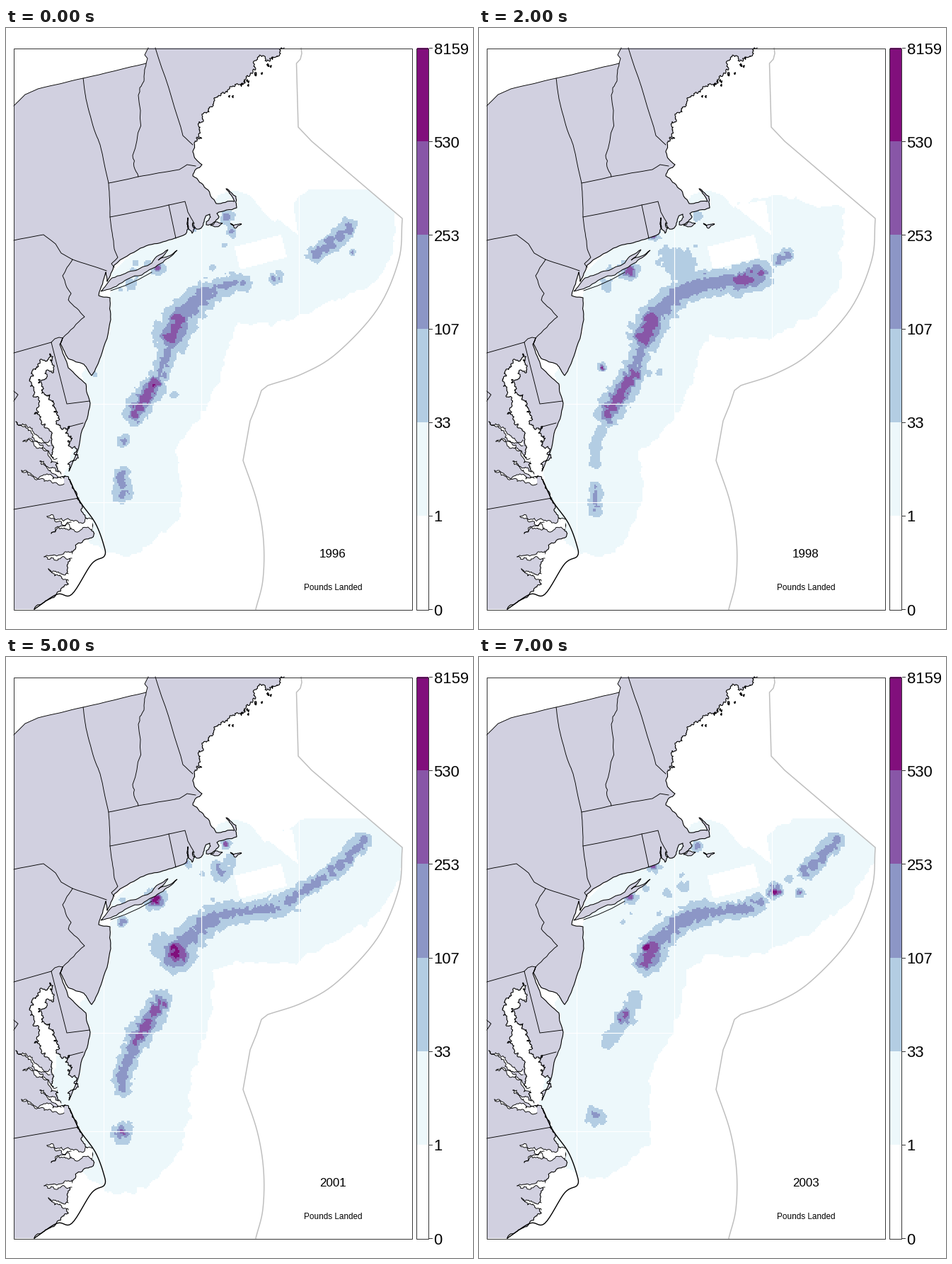
Recreate the animation shown at these times as a matplotlib script. Size 660 by 849 pixels, loop 8 s.

```python
import numpy as np
import matplotlib.pyplot as plt
from matplotlib.animation import FuncAnimation
from matplotlib.colors import ListedColormap
from matplotlib.patches import Polygon, Rectangle
from matplotlib.path import Path

W, H, DPI = 660, 849, 64
PT = 72 / DPI
L, R, T, B = 11, 575, 28, 821
COLORS = ["#ffffff", "#edf8fb", "#b3cde3", "#8c96c6", "#8856a7", "#810f7c"]
LAND = "#d1d0e0"

plt.rcParams["font.family"] = "Liberation Sans"
rng = np.random.default_rng(7)


# ---- curves ----
def spline(pts, n=8):
    """Catmull-Rom curve through the points, n steps per span."""
    p = np.array(pts, float)
    last = len(p) - 1
    p = np.vstack([2 * p[0] - p[1], p, 2 * p[-1] - p[-2]])
    t = np.linspace(0, last, last * n + 1)
    i = np.minimum(t.astype(int), last - 1)
    f = (t - i)[:, None]
    a, b, c, d = (p[i + k] for k in range(4))
    return b + f / 2 * (c - a + f * (2 * a - 5 * b + 4 * c - d + f * (3 * (b - c) + d - a)))


def rough(pts, amp, rounds=3):
    """Fractal midpoint displacement along a polyline."""
    p = np.array(pts, float)
    for _ in range(rounds):
        d = p[1:] - p[:-1]
        mid = (p[1:] + p[:-1]) / 2
        mid += np.column_stack([-d[:, 1], d[:, 0]]) * rng.uniform(-amp, amp, (len(d), 1))
        out = np.empty((2 * len(p) - 1, 2))
        out[::2], out[1::2] = p, mid
        p = out
    return p


# Seaward limit, and the shelf edge that the catch follows from south to north
LIMIT = np.vstack([
    [(417, 28), (418, 36), (416, 44), (410.5, 50), (413, 140), (432, 160), (560, 269)],
    spline([(560, 271), (555, 328), (525, 397), (468, 459), (420, 488), (370, 505)]),
    [(361, 512), (354, 533), (345, 555)],
    spline([(335, 611), (355, 670), (364, 725), (363, 780), (353, 821)]),
])
SHELF = spline([(165, 690), (165, 655), (164, 620), (167, 582), (187, 535), (206, 508), (226, 465),
                (241, 420), (268, 388), (308, 364), (380, 354), (418, 331), (468, 297), (508, 256)])


def shelf(u):
    k = np.arange(len(SHELF)) / 8
    return np.interp(u, k, SHELF[:, 0]), np.interp(u, k, SHELF[:, 1])


# ---- catch grid: 2 px cells holding a class from 0 to 5 ----
X, Y = np.meshgrid(np.arange(L + 1, R, 2.0), np.arange(T + 1, B, 2.0))


def smooth_noise(passes):
    n = rng.normal(size=X.shape)
    for _ in range(passes):
        for axis in (0, 1):
            n = (np.roll(n, 1, axis) + 2 * n + np.roll(n, -1, axis)) / 4
    return n / n.std()


EDGE, DRIFT = smooth_noise(2), smooth_noise(8)


def inside(pts):
    cells = np.column_stack([X.ravel(), Y.ravel()])
    return Path(pts).contains_points(cells).reshape(X.shape)


INSHORE = inside([(150, 345), (200, 300), (285, 262), (300, 236), (322, 229), (345, 236), (366, 262),
                  (400, 293), (380, 354), (308, 364), (241, 420), (206, 508), (165, 582), (165, 690),
                  (120, 710), (95, 655), (91, 625), (120, 530), (107, 488), (148, 430), (148, 375)])
CLOSED = (inside([(323, 309), (389, 292), (397, 324), (331, 341)])
          | inside([(361, 251), (405, 243), (413, 293)])
          | ((X > 345) & (Y < 229)) | ~inside(np.vstack([LIMIT, [(L, B), (L, T)]])))
REACH_AT = [0, 1, 3, 5, 7, 9, 11, 12, 13]


def heat(dist, radius, peak):
    """Class 2 at the radius, rising to the peak class at the centre."""
    q = np.clip((dist + EDGE * min(2, 0.15 * radius)) / radius, 0, 1)
    rise = (peak - 1) * (1 - q) ** 1.5 * (1 + 0.1 * DRIFT)
    return np.where(q < 1, np.minimum(2 + rise, int(peak)), 0)


def season(reach, runs, spots):
    """reach: light zone width; runs: (from, to, radius, peak) on the shelf; spots: (x, y, radius, peak)."""
    light = INSHORE.copy()
    for u in np.arange(0, 13.01, 0.125):
        x, y = shelf(u)
        light |= np.hypot(X - x, Y - y) < np.interp(u, REACH_AT, reach) + 2 * DRIFT + 0.5 * EDGE
    g = light.astype(float)
    for u0, u1, radius, peak in runs:
        dist = np.min([np.hypot(X - x, Y - y)
                       for x, y in map(shelf, np.arange(u0, u1 + 0.01, 0.125))], axis=0)
        g = np.maximum(g, heat(dist, radius, peak))
    specks = [(rng.uniform(155, 310), rng.uniform(300, 375), rng.uniform(2, 5), 2) for _ in range(8)]
    for x, y, radius, peak in spots + specks:
        g = np.maximum(g, heat(np.hypot(X - x, Y - y), radius, peak))
    g[CLOSED] = 0
    return g.astype(int)


s1996 = season(
    [54, 84, 66, 80, 80, 55, 66, 80, 42],
    [(0.9, 1.7, 13, 3.4), (3, 3, 9, 3.6), (3.8, 5.2, 17, 4.3), (5, 5, 17, 5.5), (5.2, 6.6, 13, 3),
     (6.6, 7.3, 26, 4.2), (7.3, 8.5, 21, 3.8), (8.5, 9.4, 13, 3), (10, 10.2, 9, 3.5), (11.4, 12.5, 13, 3.7)],
    [(214, 338, 11, 4), (176, 363, 8, 2), (312, 266, 11, 3.4), (318, 288, 8, 3), (263, 284, 6, 4),
     (238, 518, 5, 2), (490, 317, 5, 3), (125, 488, 4, 2)])
s1997 = season(
    [30, 76, 68, 78, 66, 48, 54, 0, 0],
    [(0.4, 1.6, 8, 2.6), (2.5, 3.1, 8, 3.2), (4, 5.9, 16, 3.8), (5, 5, 16, 4.3)],
    [(235, 355, 34, 4.3), (262, 335, 30, 3.7), (210, 409, 28, 4), (235, 420, 32, 3.5), (298, 352, 26, 2),
     (182, 372, 24, 2), (250, 385, 34, 2), (332, 358, 9, 2), (212, 341, 14, 4.2), (314, 267, 14, 5),
     (263, 283, 7, 4.6), (126, 488, 6, 4), (239, 488, 8, 2)])
s1998 = season(
    [55, 66, 58, 82, 80, 72, 95, 45, 5],
    [(0.3, 1.2, 10, 3.1), (2.2, 3.4, 8, 2.8), (3.8, 5.6, 19, 4.2), (5, 5, 18, 5.1), (5.6, 6.6, 15, 3),
     (6.6, 7.3, 24, 4.8), (7.3, 9.8, 20, 3.7), (9.8, 10.4, 23, 4.4), (11.1, 11.4, 10, 3.2)],
    [(285, 335, 24, 2), (265, 320, 12, 2), (212, 343, 15, 4.6), (180, 364, 9, 2.6), (248, 293, 9, 4.4),
     (308, 264, 8, 2), (174, 478, 7, 5.2), (240, 487, 5, 2), (255, 486, 5, 2)])
s1999 = season(
    [75, 102, 78, 94, 88, 75, 82, 80, 62],
    [(0, 1.2, 11, 2.9), (2.4, 3.1, 10, 3.2), (4, 5.7, 16, 3.6), (5, 5, 16, 4.3), (8, 10.1, 14, 3.6),
     (11.9, 12.6, 12, 3.4)],
    [(241, 417, 28, 5.4), (213, 408, 20, 2), (230, 382, 18, 3.2), (212, 342, 20, 5.2), (183, 363, 14, 3.8),
     (232, 328, 14, 3.3), (248, 296, 11, 4), (293, 324, 17, 2.9), (317, 290, 11, 3.2), (312, 264, 9, 3),
     (509, 247, 9, 3.5)])
s2001 = season(
    [67, 90, 98, 80, 50, 68, 86, 86, 62],
    [(0.55, 0.55, 16, 4.4), (2.4, 3.9, 14, 3.6), (3.9, 5.6, 18, 4), (7.2, 8.7, 21, 3.4), (8.7, 10.6, 16, 3.1),
     (10.6, 11.7, 12, 3.5), (11.9, 13, 13, 3.7)],
    [(241, 418, 29, 5.4), (222, 406, 18, 2), (211, 343, 16, 5.6), (304, 303, 15, 3.2), (316, 288, 9, 2),
     (310, 262, 9, 4), (165, 373, 8, 3.9), (256, 291, 7, 3)])
s2003 = season(
    [35, 78, 72, 68, 56, 58, 75, 72, 60],
    [(1.2, 1.2, 14, 3.6), (3.8, 5.7, 10, 2.8), (5, 5, 14, 5.4), (6.8, 7.3, 22, 4.6), (7.3, 9.2, 18, 3.8),
     (9.2, 10.4, 14, 3.9), (11, 11, 13, 5.5), (11.9, 13, 13, 3.9)],
    [(237, 413, 12, 5.4), (454, 333, 8, 4.3), (438, 313, 6, 2), (248, 296, 10, 4), (307, 267, 9, 3),
     (213, 339, 11, 4.2), (290, 325, 8, 2), (267, 333, 7, 2)])


def between(a, b):
    return (a + b + 1) // 2


GRIDS = [s1996, s1997, s1998, s1999, between(s1999, s2001), s2001, between(s2001, s2003), s2003]

# ---- stage ----
fig = plt.figure(figsize=(W / DPI, H / DPI), dpi=DPI, facecolor="white")
ax = fig.add_axes([0, 0, 1, 1])
catch = ax.imshow(GRIDS[0], cmap=ListedColormap(COLORS), vmin=-0.5, vmax=5.5, aspect="auto",
                  extent=(L, R, B, T), interpolation="nearest", zorder=1)
ax.set_xlim(0, W)
ax.set_ylim(H, 0)
ax.axis("off")


def line(pts, color="black", width=0.9, z=5):
    xs, ys = zip(*pts)
    ax.plot(xs, ys, color=color, lw=width * PT, zorder=z, solid_joinstyle="round")


def island(pts, amp):
    ax.add_patch(Polygon(rough(pts + pts[:1], amp), fc=LAND, ec="black", lw=PT, zorder=5))


def river(head, mouth, width):
    """Tapered inlet with ragged banks, open at its mouth."""
    mid = rough([head, mouth], 0.15, 2)
    half = np.linspace(0, width, len(mid))[:, None] * [0, 1]
    banks = [rough(mid + side * half, 0.35) for side in (-1, 1)]
    ax.add_patch(Polygon(np.vstack([banks[0], banks[1][::-1]]), fc="white", ec="none", zorder=6))
    for bank in banks:
        line(bank, z=7)


for x in (138, 276, 414):
    line([(x, T), (x, B)], "white", 1.2, 2)
for y in (531, 669.5):
    line([(L, y), (R, y)], "white", 1.2, 2)
line(LIMIT, "#bebebe", 1.5, 3)

# ---- mainland, clockwise from the northwest ----
border = rough([(11, 110), (27, 94), (45, 86), (109, 71), (198, 50), (200, 43), (196, 38), (201, 28)], 0.01)
coast = np.vstack([
    rough([(393, 28), (376, 41), (350, 54), (340, 68), (316, 84), (297, 98), (279, 121), (274, 144),
           (266, 162)], 0.42, 5),
    rough([(266, 162), (264, 175), (277, 193), (264, 209), (283, 227), (297, 248), (323, 245), (311, 227),
           (325, 238), (326, 254), (298, 262), (301, 267), (283, 278)], 0.13),
    rough([(283, 278), (288, 263), (277, 281), (268, 283), (264, 275), (263, 290), (257, 268),
           (254, 291)], 0.25),
    rough([(254, 291), (222, 302), (190, 311), (153, 335), (143, 358), (141, 345), (131, 378)], 0.06),
    rough([(131, 378), (147, 381), (148, 412), (134, 464), (121, 491), (110, 475), (88, 467), (77, 446),
           (80, 438), (76, 447), (88, 480), (113, 503), (119, 530), (106, 573), (89, 626)], 0.05),
    rough([(89, 626), (88, 590), (84, 572), (90, 563), (74, 548), (66, 534), (62, 518), (52, 508),
           (55, 488), (62, 460)], 0.48, 5),
    rough([(62, 460), (47, 474), (38, 492), (38, 520), (48, 553), (64, 586), (72, 612), (80, 634),
           (90, 638)], 0.42, 5),
    rough([(90, 638), (104, 668), (108, 684), (122, 700), (124, 716), (94, 740), (86, 770), (88, 786),
           (72, 798), (40, 821)], 0.22, 4),
])
ax.add_patch(Polygon(np.vstack([border, coast, [(11, 821)]]), fc=LAND, ec="none", zorder=4))
line(border)
line(coast, width=1.1)
line(spline([(90, 638), (104, 668), (126, 699), (138, 730), (139, 746), (121, 757), (93, 800), (72, 800),
             (40, 821)]), width=1.4)

for head, mouth, width in [((14, 556), (62, 586), 4), ((24, 584), (72, 612), 4), ((48, 612), (78, 633), 3),
                           ((22, 625), (82, 640), 4), ((58, 690), (122, 701), 7), ((64, 714), (92, 702), 4),
                           ((54, 747), (93, 744), 5), ((60, 764), (88, 776), 5)]:
    river(head, mouth, width)

island([(134, 372), (150, 353), (180, 343), (206, 332), (229, 313), (215, 328), (242, 314), (222, 331),
        (192, 349), (156, 365)], 0.08)
line([(148, 371), (168, 364), (188, 355), (206, 345)])
island([(289, 279), (296, 274), (306, 276), (301, 280)], 0.15)
island([(317, 276), (322, 279), (333, 277), (324, 283)], 0.15)
for k in rng.uniform(0, 1, 16):
    x, y = 312 + 72 * k + rng.uniform(-3, 5), 96 - 57 * k + rng.uniform(-4, 5)
    island([(x, y), (x + 2, y - 1), (x + 1.5, y + 2)], 0.3)

# ---- state lines: (wiggle, points) ----
STATES = [
    (0.02, [(109, 71), (113, 100), (127, 150), (133, 165), (145, 219), (147, 267), (153, 312), (158, 324),
            (149, 333), (153, 338)]),
    (0.1, [(198, 50), (195, 75), (187, 95), (179, 180), (187, 210)]),
    (0.01, [(211, 28), (247, 140), (250, 152), (264, 165)]),
    (0.01, [(145, 219), (187, 210), (245, 200), (256, 193), (268, 195)]),
    (0.01, [(147, 267), (230, 250), (253, 245), (257, 260), (266, 276)]),
    (0, [(230, 250), (240, 297)]),
    (0.01, [(11, 300), (53, 292), (70, 305), (78, 318), (94, 327), (142, 343)]),
    (0.06, [(94, 327), (80, 350), (92, 375), (88, 384), (111, 408), (80, 438)]),
    (0, [(11, 459), (64, 444), (86, 531), (118, 527)]),
    (0, [(64, 444), (69, 439), (75, 437), (80, 438)]),
    (0, [(90, 563), (109, 558)]),
    (0, [(11, 680), (103, 664)]),
    (0, [(11, 513), (17, 518), (11, 527)]),
]
for wiggle, pts in STATES:
    line(rough(pts, wiggle))


# ---- frame, colour bar and captions ----
def box(x0, x1):
    ax.add_patch(Rectangle((x0, T + 1), x1 - x0, B - T, fc="none", ec="#222222", lw=0.9 * PT, zorder=8))


step = (B - T) / 6
for i, c in enumerate(COLORS):
    ax.add_patch(Rectangle((581, B - (i + 1) * step), 16, step, fc=c, ec="none", zorder=4))
box(L, R - 1)
box(580, 597)
for i, label in enumerate(["0", "1", "33", "107", "253", "530", "8159"]):
    y = B - i * step
    line([(597.5, y), (602, y)], "#222222", 0.9, 6)
    ax.text(604.5, y + 8.5, label, size=22 * PT)
year = ax.text(462, 748, "", size=17 * PT, ha="center")
ax.text(462, 793.5, "Pounds Landed", size=11.8 * PT, ha="center")


def draw(i):
    catch.set_data(GRIDS[i])
    year.set_text(str(1996 + i))
    return catch, year


anim = FuncAnimation(fig, draw, frames=len(GRIDS), interval=1000, repeat=True, repeat_delay=0)
plt.show()
```
